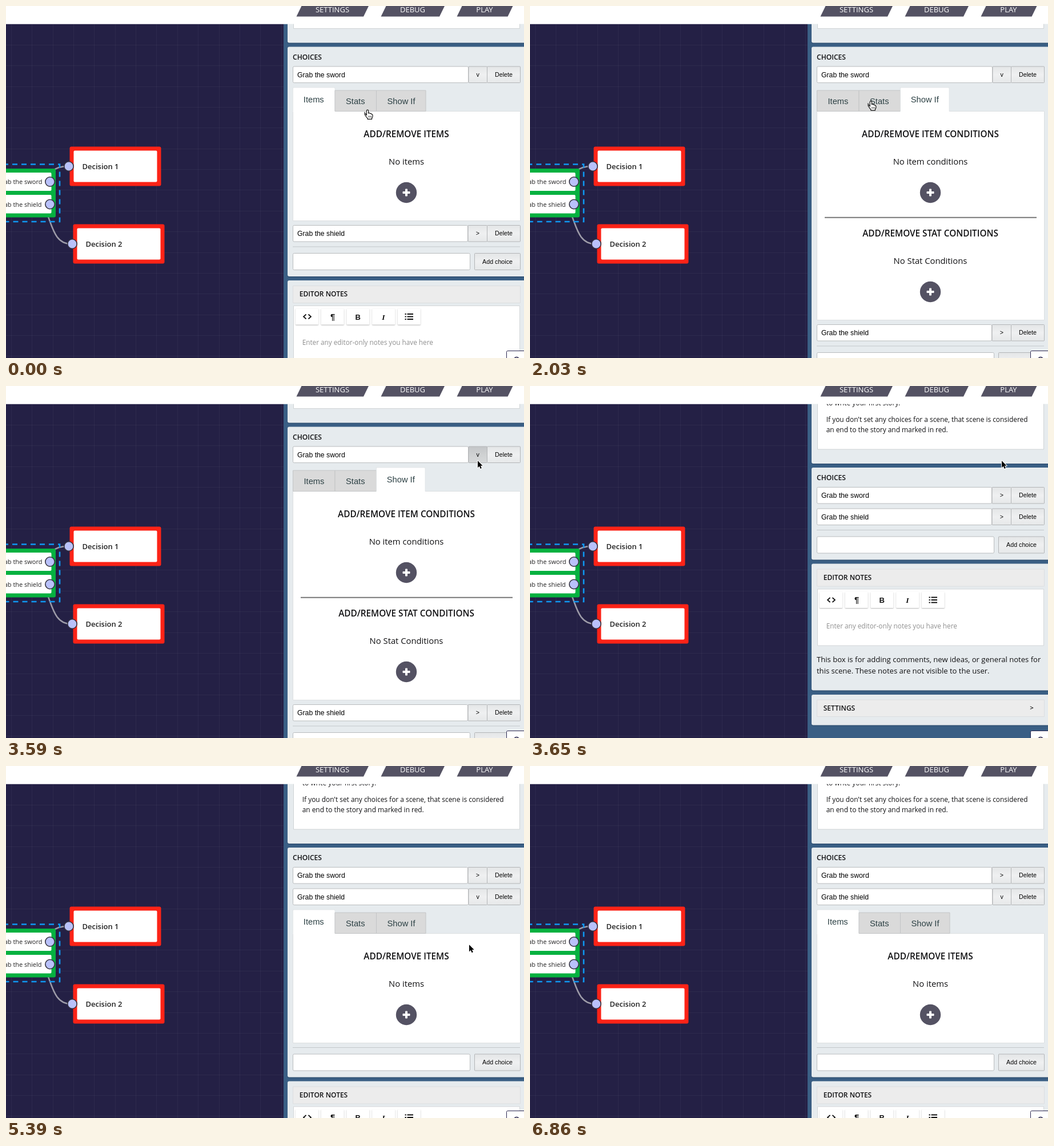
An HTML page with a canvas for the animation above (7580 ms loop, 907 by 617 pixels).

```html
<!DOCTYPE html>
<html lang="en">
<head>
<meta charset="utf-8">
<title>Story editor choices</title>
<style>
html, body { margin: 0; width: 100%; height: 100%; overflow: hidden; background: #fff; }
canvas { display: block; width: 907px; height: 617px; }
</style>
</head>
<body>
<canvas id="stage" width="907" height="617"></canvas>
<script>
const c = document.getElementById('stage').getContext('2d');
const W = 907, H = 617, LOOP = 7580, TOP = 31.5;
const SANS = '"Open Sans", "Noto Sans", sans-serif';
const UI = '"Liberation Sans", Arial, sans-serif';
const SLATE = '#545263', INK = '#111113', PANEL = '#e6ebee';
const ROW = 37.5, TAB_H = 41;

// Cursor path: time, x, y of the tip
const PATH = [
  [0, 633, 182.5], [60, 633, 180], [150, 633, 178], [480, 633, 178],
  [970, 675, 173], [1520, 675, 173], [2030, 597, 167], [2210, 549, 163],
  [2460, 549, 163], [2940, 825, 137], [3080, 828, 135], [3230, 826, 132],
  [3500, 826, 132], [3560, 826, 131], [3840, 826, 131], [4110, 816, 180],
  [4370, 822, 229], [4980, 822, 229], [5390, 811, 313], [5750, 811, 409],
  [5990, 807, 445], [6250, 833, 525], [6510, 862, 591], [6860, 869, 620],
  [7580, 869, 620]
];

function slope(i, k) {
  const a = PATH[i - 1], b = PATH[i], d = PATH[i + 1];
  if (!a || !d) return 0;
  const still = (p, q) => p[1] === q[1] && p[2] === q[2];
  return still(a, b) || still(b, d) ? 0 : (d[k] - a[k]) / (d[0] - a[0]);
}

function cursorAt(t) {
  let i = 0;
  while (i < PATH.length - 2 && t >= PATH[i + 1][0]) i++;
  const a = PATH[i], b = PATH[i + 1], span = b[0] - a[0], u = (t - a[0]) / span;
  const at = k => {
    const s = u * u * (3 - 2 * u);
    return a[k] + (b[k] - a[k]) * s
      + span * (slope(i, k) * u * (1 - u) ** 2 - slope(i + 1, k) * u * u * (1 - u));
  };
  return [at(1), at(2)];
}

function rect(x, y, x2, y2, fill, stroke, r = 0) {
  c.beginPath();
  c.roundRect(x, y, x2 - x, y2 - y, r);
  if (fill) { c.fillStyle = fill; c.fill(); }
  if (stroke) { c.strokeStyle = stroke; c.lineWidth = 1; c.stroke(); }
}

function text(s, x, y, font, color = INK, align = 'left') {
  c.font = font;
  c.fillStyle = color;
  c.textAlign = align;
  c.fillText(s, x, y);
}

function line(pts, color, width) {
  c.beginPath();
  pts.forEach(([x, y], i) => i ? c.lineTo(x, y) : c.moveTo(x, y));
  c.strokeStyle = color;
  c.lineWidth = width;
  c.stroke();
}

function shape(pts, fill) {
  c.beginPath();
  pts.forEach(([x, y]) => c.lineTo(x, y));
  c.closePath();
  c.fillStyle = fill;
  c.fill();
}

function shadowed(color, blur, dy, draw) {
  c.save();
  c.shadowColor = color;
  c.shadowBlur = blur;
  c.shadowOffsetY = dy;
  draw();
  c.restore();
}

function disc(x, y) {
  c.beginPath();
  c.arc(x, y, 8.2, 0, 7);
  c.fillStyle = '#b9c1fb';
  c.fill();
  c.strokeStyle = '#35333f';
  c.lineWidth = 1.6;
  c.stroke();
}

function decision(x, y, label) {
  rect(x, y, x + 160, y + 69, '#fc2317', null, 3);
  rect(x + 7, y + 7, x + 153, y + 62, '#fff', null, 2);
  text(label, x + 22, y + 39.3, '600 13px ' + SANS, '#222');
}

function graph() {
  rect(0, TOP, 486, H, '#242045');
  c.fillStyle = 'rgba(255,255,255,.045)';
  for (let x = 9; x < 486; x += 36.35) c.fillRect(Math.round(x), 32, 1, H);
  for (let y = 68; y < H; y += 36.35) c.fillRect(0, Math.round(y), 486, 1);

  c.strokeStyle = '#9d9ba8';
  c.lineWidth = 2.5;
  c.stroke(new Path2D('M80 290Q90 281 108 281M73 367C82 390 87 417 114 417'));

  rect(-20, 285, 87, 370.5, '#06b140', null, 3);
  rect(-20, 292, 79.5, 324, '#fff', null, 2);
  rect(-20, 331, 79.5, 363.5, '#fff', null, 2);
  text('Grab the sword', -15.6, 312, '11px ' + SANS, '#222');
  text('Grab the shield', -15.6, 351.5, '11px ' + SANS, '#222');

  c.setLineDash([9, 7]);
  line([[-5, 277.5], [94, 277.5], [94, 378], [-5, 378]], '#0f98f3', 2.6);
  c.setLineDash([]);

  decision(111.5, 246.5, 'Decision 1');
  decision(117.5, 382.5, 'Decision 2');
  disc(110, 281);
  disc(116, 417);
  disc(77, 308);
  disc(77, 347.5);
}

function header() {
  rect(0, 0, W, TOP, '#fff');
  [['SETTINGS', 508.5, 635, 571.5], ['DEBUG', 656.5, 768, 712], ['PLAY', 789.5, 887.5, 838]]
    .forEach(([s, l, r, mid]) => {
      shape([[l + 9, 0], [r, 0], [r - 9, 18.5], [l, 18.5]], SLATE);
      text(s, mid, 11, '13px ' + SANS, '#fff', 'center');
    });
}

function panel(y, y2) {
  shadowed('rgba(15,35,60,.4)', 2, 1, () => rect(493, y, 925, y2, PANEL, null, 3));
}

function button(x, x2, y, h, label, down) {
  const g = c.createLinearGradient(0, y, 0, y + h);
  g.addColorStop(0, down ? '#c4c6c8' : '#e4e6e7');
  g.addColorStop(.5, down ? '#cfd1d2' : '#eff0f1');
  g.addColorStop(1, down ? '#d6d8d9' : '#e6e8e9');
  rect(x, y, x2, y + h, g, '#b3b5b7', 1);
  text(label, (x + x2) / 2, y + h / 2 + 3.5, '10.7px ' + UI, '#000', 'center');
}

function choice(y, label, open, down) {
  const split = open ? 809.5 : 808.5;
  rect(502.5, y, split, y + 28.5, '#fff', '#b9bcbe', 2);
  text(label, 510, y + 18.8, '12.25px ' + UI, '#000');
  button(split + .5, 842.5, y, 28.5, open ? 'v' : '>', down);
  button(842.5, 900.5, y, 28.5, 'Delete');
}

function section(y, title, note) {
  text(title, 701, y + 45.8, '600 15.3px ' + SANS, INK, 'center');
  text(note, 701, y + 93, '14.8px ' + SANS, INK, 'center');
  const cy = y + 142.5;
  c.beginPath();
  c.arc(701, cy, 18.2, 0, 7);
  c.fillStyle = SLATE;
  c.fill();
  rect(694.5, cy - 2, 707.5, cy + 2, '#fff', null, 1);
  rect(699, cy - 6.5, 703, cy + 6.5, '#fff', null, 1);
}

const pageHeight = tab => tab === 2 ? 366 : 192;

function tabs(y, active) {
  rect(502.5, y, 900.5, y + pageHeight(active), '#fff', '#dcdfe1');
  let x = 502.5;
  [['Items', 73.5], ['Stats', 72.5], ['Show If', 86.5]].forEach(([s, w], i) => {
    const on = i === active, right = x + w - (on && i ? 1 : 0);
    if (on) {
      rect(x, y - 41.5, right, y + 1, '#fff', null, [2, 2, 0, 0]);
      line([[x, y], [x, y - 41.5], [right, y - 41.5], [right, y]], '#dfe2e4', .7);
    } else {
      rect(x, y - 36.5, right, y, '#dadada', '#c3c5c6');
    }
    text(s, x + (on ? 18.3 : 19), y - (on ? 15.3 : 12.5), '14.7px ' + UI, '#2c4044');
    x = right;
  });
  if (active === 0) section(y, 'ADD/REMOVE ITEMS', 'No items');
  if (active === 1) section(y, 'INCREASE/DECREASE STATS', 'No Stats');
  if (active === 2) {
    section(y, 'ADD/REMOVE ITEM CONDITIONS', 'No item conditions');
    rect(516, y + 185.2, 887, y + 187.2, '#777');
    section(y + 174, 'ADD/REMOVE STAT CONDITIONS', 'No Stat Conditions');
  }
}

// Returns the bottom edge of the panel
function choices(top, s) {
  const openHeight = TAB_H + pageHeight(s.tab) + 8;
  let y = top + 34.5;
  const rule = s.open.reduce((sum, open) => sum + ROW + (open ? openHeight : 0), y);
  const end = rule + 52;
  panel(top, end);
  text('CHOICES', 502, top + 22.3, '600 12.1px ' + SANS);
  ['Grab the sword', 'Grab the shield'].forEach((label, i) => {
    choice(y, label, s.open[i], s.down === i);
    y += ROW;
    if (s.open[i]) {
      tabs(y + TAB_H, s.tab);
      y += openHeight;
    }
  });
  rect(502, rule - .5, 900, rule + .5, '#c3c8cb');
  rect(502.5, rule + 11.5, 812.5, rule + 40.5, '#fff', '#b9bcbe', 2);
  button(820.5, 900.5, rule + 11.5, 29, 'Add choice');
  return end;
}

function toolbar(y) {
  for (let i = 0; i < 5; i++) {
    const x = 507 + i * 44.7;
    shadowed('rgba(0,0,0,.28)', 2, 1, () => rect(x, y, x + 40, y + 28, '#fff', null, 1));
  }
  const m = y + 14;
  line([[525.5, m - 4], [521, m], [525.5, m + 4]], '#111', 1.7);
  line([[529.5, m - 4], [534, m], [529.5, m + 4]], '#111', 1.7);
  text('¶', 572, m + 5, 'bold 14.5px ' + UI, '#111', 'center');
  text('B', 616.3, m + 5, 'bold 13px ' + UI, '#111', 'center');
  text('I', 661, m + 5, 'italic 600 13.5px "Liberation Serif", serif', '#111', 'center');
  for (const dy of [-4.5, 0, 4.5]) {
    rect(698.5, m + dy - 1, 700.8, m + dy + 1, '#111');
    rect(702.5, m + dy - 1, 713, m + dy + 1, '#111');
  }
}

function notes(y) {
  panel(y, y + 222);
  rect(502.5, y + 9.5, 900.5, y + 39.5, '#ececec', '#dcdee0');
  text('EDITOR NOTES', 513.7, y + 28.4, '600 12px ' + SANS);
  rect(503.5, y + 44.5, 899.5, y + 143.5, '#fff', '#d3d6d8');
  toolbar(y + 49.5);
  text('Enter any editor-only notes you have here', 518.7, y + 113.2, '11.75px ' + SANS, '#8f8f8f');
  text('This box is for adding comments, new ideas, or general notes for', 502, y + 172.3, '13.07px ' + SANS);
  text('this scene. These notes are not visible to the user.', 502, y + 192.5, '13.07px ' + SANS);
  const top = y + 229.5;
  panel(top, top + 53.5);
  rect(502.5, top + 9, 900.5, top + 38.5, '#ececec', '#dcdee0');
  text('SETTINGS', 513.7, top + 28, '600 12px ' + SANS);
  text('>', 878.5, top + 26.8, '600 11.5px ' + SANS, '#111', 'center');
}

function sidebar(s) {
  rect(486, TOP, W, H, '#3a5f85');
  const top = s.scrolled ? 143 : 71.5;
  panel(-40, top - 7);
  rect(503.5, -30, 899.5, top - 32, '#fff', '#cfd3d5');
  const font = '11.9px ' + SANS;
  text('to write your first story.', 518.7, top - 109.3, font);
  text("If you don't set any choices for a scene, that scene is considered", 518.7, top - 80, font);
  text('an end to the story and marked in red.', 518.7, top - 62.3, font);
  notes(choices(top, s) + 7);
}

function helpTab() {
  rect(876.5, 604.5, 925, 640, '#fff', '#2b2850', 2);
  c.beginPath();
  c.arc(894, 619.5, 4, 0, 7);
  c.strokeStyle = '#2b2850';
  c.lineWidth = 1.6;
  c.stroke();
}

const ARROW = new Path2D('M0 0V12.2L2.8 9.6L4.7 14L6.8 13.1L4.9 8.8H8.6Z');
const HAND = new Path2D('M-1.6 9V1.3Q-1.6-.3 0-.3T1.6 1.3V5.6Q2.2 4.6 3.4 5T4.6 6.2Q5.6 5.6 6.6 6.2T7.2 7.4Q8.9 7.2 9 9V11Q8.6 13 7.6 14V15.8H0V14.2Q-2 12.6-3.2 10.2L-4.6 8.2Q-5-.2-4.6 7.2Q-3.4 5.8-2.4 7.4Z');

function cursor([x, y]) {
  const hand = x > 502 && x < 735 && y > 143 && y < 184;
  c.save();
  c.translate(x, y);
  c.lineJoin = 'round';
  if (hand) {
    c.fillStyle = '#fff';
    c.fill(HAND);
    c.strokeStyle = '#111';
    c.lineWidth = 1.2;
    c.stroke(HAND);
    for (const fx of [2, 4.2, 6.3]) line([[fx, 10], [fx, 13]], '#111', .8);
  } else {
    c.strokeStyle = '#fff';
    c.lineWidth = 2;
    c.stroke(ARROW);
    c.fillStyle = '#000';
    c.fill(ARROW);
  }
  c.restore();
}

function stateAt(t) {
  return {
    tab: t < 500 || t >= 4790 ? 0 : t < 1510 ? 1 : 2,
    open: [t < 3650, t >= 4790],
    scrolled: t >= 3650,
    down: t >= 3470 && t < 3650 ? 0 : t >= 4610 && t < 4790 ? 1 : -1
  };
}

function draw(now) {
  const t = now % LOOP;
  c.clearRect(0, 0, W, H);
  graph();
  sidebar(stateAt(t));
  header();
  helpTab();
  if (t < 6860) cursor(cursorAt(t));
  requestAnimationFrame(draw);
}
requestAnimationFrame(draw);
</script>
</body>
</html>
```
